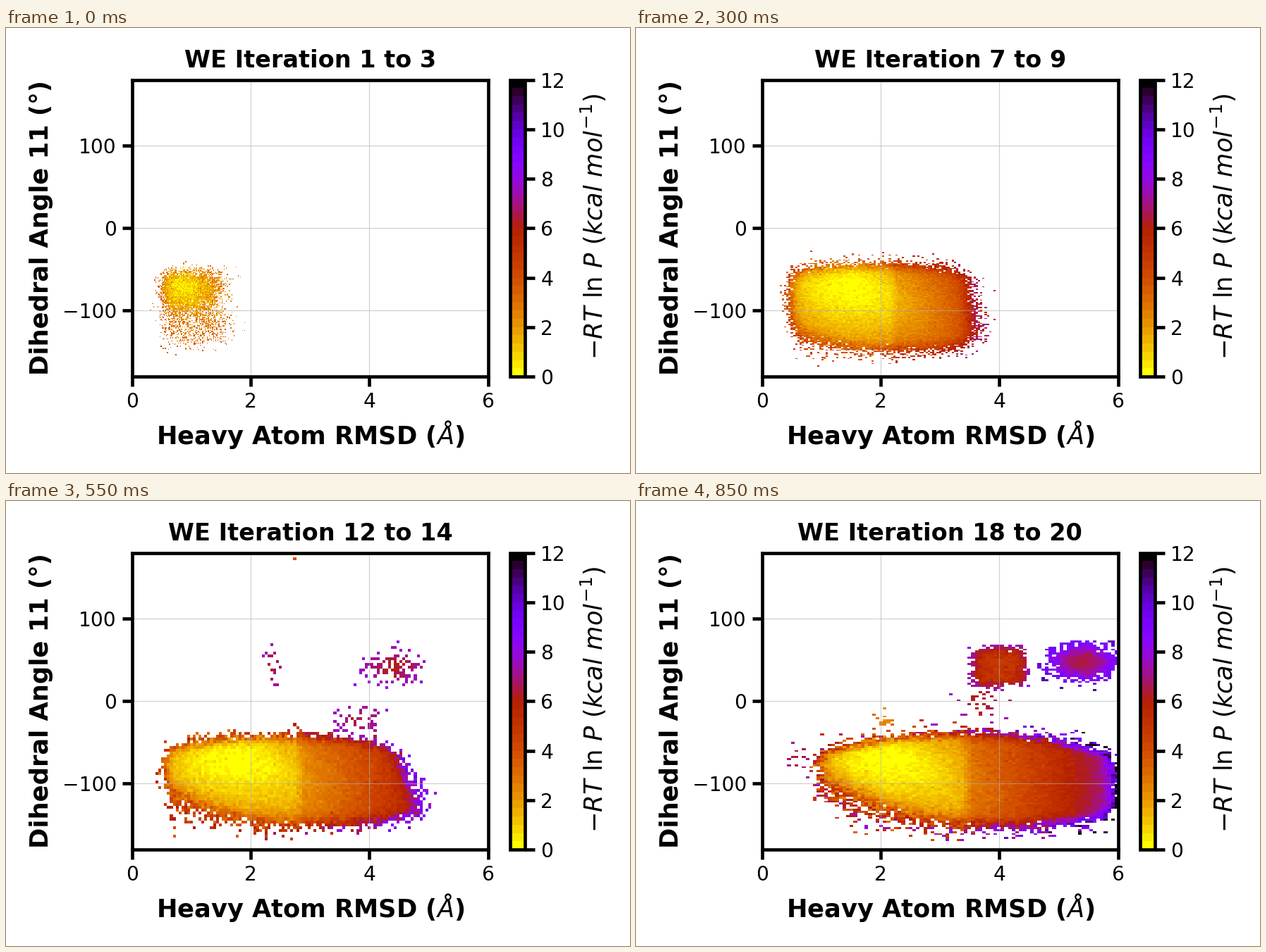
Recreate the animation shown at these times as a matplotlib script. Size 885 by 632 pixels, loop 900 ms.

```python
import numpy as np
import matplotlib.pyplot as plt
from matplotlib.animation import FuncAnimation

W, H, DPI = 885, 632, 100
S = 1.69                     # scale from design points to points at this dpi
FRAMES, BINS, RT = 18, 100, 0.593

plt.rcParams.update({"font.family": "DejaVu Sans", "font.size": 12 * S,
                     "mathtext.fontset": "dejavusans"})

# Sparse side groups: first and last frame, x, y, half width, half height, energy
SPECKS = [(10, 13, 2.38, 42, .12, 16, 6.4),
          (10, 14, 3.85, -22, .30, 12, 6.7),
          (14, 17, 2.05, -20, .13, 12, 2.4),
          (15, 17, 0.60, -65, .14, 13, 6.3),
          (13, 17, 3.75, 0, .30, 14, 6.2)]


def ramp(value, start, end):
    return np.clip((value - start) / (end - start), 0, 1)


def soft(depth):
    """Soft edge: about one walker per bin at depth zero."""
    return 1 / (1 + np.exp(np.clip(2.5 - depth, -40, 40)))


def reach(frame):
    """Right end of the sampled basin."""
    return 1.7 + 4.3 * (frame / (FRAMES - 1)) ** .8


def basin(frame, x, y, rng):
    """Weights of the walkers in the main basin."""
    t = frame / (FRAMES - 1)
    early = np.exp(-frame / 2)
    left = .45 + .4 * ramp(frame, 10, 17)
    slant = .5 * np.exp(-((frame - 10) / 3.5) ** 2)
    right = reach(frame) + slant * (ramp(-y, 50, 130) - .6)
    s = ramp(x, left, reach(frame))

    # Outline: both ends of the basin round off as it grows
    top = -47 + 10 * t - 26 * t * (2 * s - 1) ** 2
    bottom = -146 - 12 * t + 60 * t * (1 - s) ** 4 + 18 * t * s ** 4
    inside = (soft((x - left) / .045) * soft((right - x) / .08)
              * soft((top - y) / 3.6) * soft((y - bottom) / (4 + 9 * t * (1 - s) ** 3)))

    # Energy: a valley that moves right, with a step on its far slope
    x0 = .85 + 1.35 * t ** .6
    climb = ramp(x, x0, reach(frame))
    height = 1 + 6.4 * t ** .7
    energy = height * (.85 * climb ** 1.3 + .15 * ramp(climb, .3, .36))
    energy += 1.5 * ramp(-x, -x0, -left) ** 2 + .5 * early
    mid = -71 - 24 * np.clip(x - x0, 0, 1.5)
    energy += (1.5 * (1 - np.exp(-((y - mid) / 40) ** 2))
               * np.exp(-((x - x0) / 1.3) ** 2))
    energy += 5 * t * rng.random(x.shape) * (1 - inside) ** 3

    walkers = 16 - 9 * early
    share = min(1, .08 + .17 * frame)
    core = np.exp(-((x - .85) / .42) ** 2 - ((y + 72) / 20) ** 2)
    count = rng.poisson(walkers * inside * (share + (1 - share) * core))
    return count * np.exp(-energy / RT) / walkers


def group(x, y, rng, cx, cy, rx, ry, n, energy, power=2):
    """Weights of a small rounded group of walkers."""
    r = np.abs((x - cx) / rx) ** power + np.abs((y - cy) / ry) ** power
    return rng.poisson(n * np.exp(-r)) * np.exp(-(energy + .4 * r) / RT) / max(n, 1)


def upper_state(frame, x, y, rng):
    """Groups that reach the upper state late in the run."""
    total = np.zeros(x.shape)
    if frame >= 10:
        cx = min(4.4 + .3 * (frame - 11), 5.4)
        rx = .35 + .25 * np.exp(-((frame - 14) / 1.5) ** 2)
        total += group(x, y, rng, cx, 42 + ramp(frame, 11, 15) * 6, rx, 14,
                       1.3 * 1.5 ** (frame - 11), 6.5)
    if frame >= 12:
        grow = ramp(frame, 12, 15)
        total += group(x, y, rng, 3.72 + .28 * grow, 42, .15 + .22 * grow, 20,
                       1 + 7 * grow, 4.9, power=4)
    for first, last, cx, cy, rx, ry, energy in SPECKS:
        if first <= frame <= last:
            total += group(x, y, rng, cx, cy, rx, ry, .4, energy)
    return total


def histogram(frame):
    """Free energy per bin and the extent of the bins."""
    rng = np.random.default_rng(40 + frame)
    stray = 10 <= frame <= 12
    x_lo, x_hi = .3, reach(frame) + .4 if frame < 13 else 6.5
    y_lo = -172 + 18 * np.exp(-frame)
    y_hi = 174 if stray else 74 if frame > 12 else -25
    mids = (np.arange(BINS) + .5) / BINS
    x, y = np.meshgrid(x_lo + mids * (x_hi - x_lo), y_lo + mids * (y_hi - y_lo))

    weight = basin(frame, x, y, rng) + upper_state(frame, x, y, rng)
    if stray:
        weight[-1, int((2.72 - x_lo) / (x_hi - x_lo) * BINS)] = np.exp(-4 / RT)

    energy = -RT * np.log(np.where(weight > 0, weight, 1))
    energy += rng.normal(0, .12 + .3 * np.exp(-frame / 2), x.shape)
    return (np.ma.masked_where(weight <= 0, np.clip(energy, .1, 12)),
            (x_lo, x_hi, y_lo, y_hi))


fig = plt.figure(figsize=(W / DPI, H / DPI), dpi=DPI, facecolor="white")


def panel(left, top, right, bottom):
    return fig.add_axes([left / W, 1 - bottom / H, (right - left) / W, (bottom - top) / H])


def label(x, y, text, size, **style):
    return fig.text(x / W, 1 - y / H, text, fontsize=size * S, ha="center",
                    va="baseline", rotation_mode="anchor", **style)


ax = panel(178.7, 73.6, 683.7, 495)
cax = panel(715.3, 73.6, 736.4, 495)

image = ax.imshow(np.ma.masked_all((BINS, BINS)), cmap=plt.get_cmap("gnuplot_r", 36),
                  vmin=0, vmax=12, origin="lower", aspect="auto",
                  interpolation="nearest", extent=(0, 6, -180, 180), zorder=0)
ax.set(xlim=(0, 6), ylim=(-180, 180), xticks=[0, 2, 4, 6], yticks=[-100, 0, 100])
ax.grid(color="#b0b0b0", alpha=.6, linewidth=.5 * S)
ax.set_axisbelow("line")
bar = fig.colorbar(image, cax=cax, ticks=range(0, 13, 2))
bar.outline.set_linewidth(2 * S)
for spine in ax.spines.values():
    spine.set_linewidth(2 * S)
for axes in (ax, cax):
    axes.tick_params(length=6 * S, width=2 * S, pad=3.3 * S, labelsize=12 * S)

title = label(431.4, 55.8, "", 14.25, weight="bold")
label(432, 591.5, r"Heavy Atom RMSD ($\AA$)", 15, weight="bold")
label(60, 283.4, "Dihedral Angle 11 (°)", 15, weight="bold", rotation=90)
label(847, 282, r"$-RT\ \ln\, P\ (kcal\ mol^{-1})$", 15, rotation=90)


def draw(frame):
    data, extent = histogram(frame)
    image.set_data(data)
    image.set_extent(extent)
    ax.set(xlim=(0, 6), ylim=(-180, 180))
    title.set_text(f"WE Iteration {frame + 1} to {frame + 3}")
    return image, title


anim = FuncAnimation(fig, draw, frames=FRAMES, interval=50, repeat=True, repeat_delay=0)
plt.show()
```
